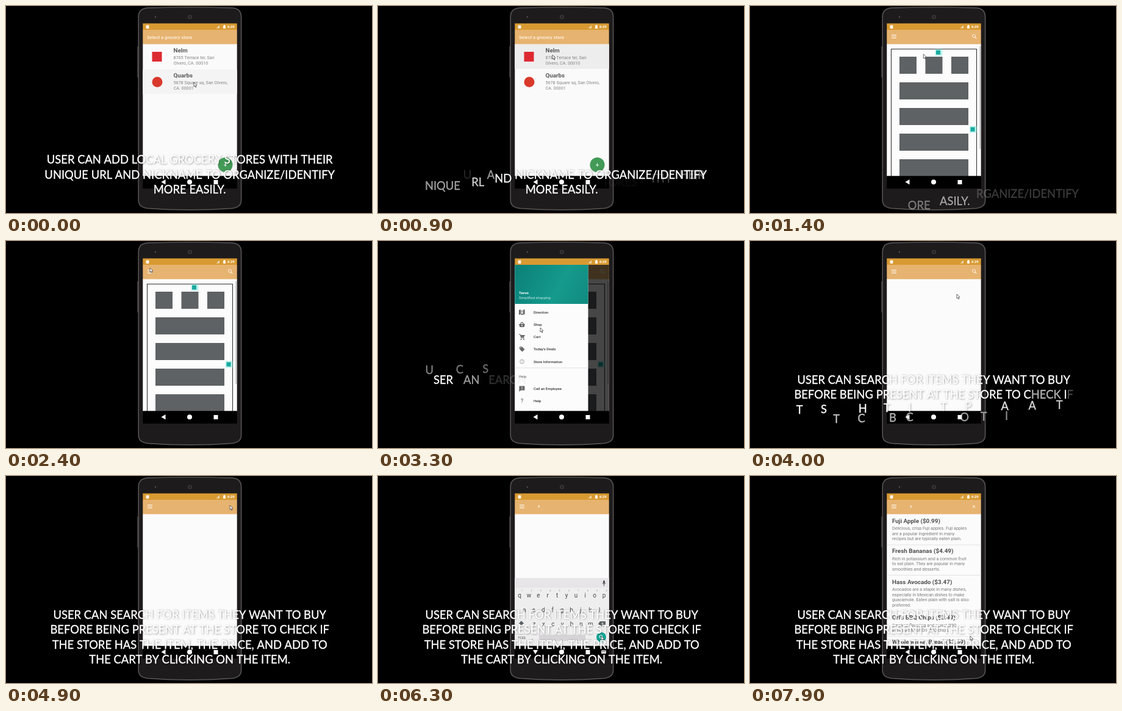
Write an HTML page with a canvas that moves like this. It is 600 px wide and 339 px high and loops after 8000 ms.

```html
<!DOCTYPE html>
<html lang="en">
<head>
<meta charset="utf-8">
<title>Grocery app demo</title>
<style>
html, body { margin: 0; width: 100%; height: 100%; overflow: hidden; background: #000; }
canvas { display: block; width: 600px; height: 339px; }
</style>
</head>
<body>
<canvas id="stage"></canvas>
<script>
const W = 600, H = 339, LOOP = 8000, STEP = 100;
const canvas = document.getElementById('stage');
const dpr = window.devicePixelRatio || 1;
canvas.width = W * dpr;
canvas.height = H * dpr;
const c = canvas.getContext('2d');

const UI = 'Roboto, "Open Sans", sans-serif';
const CAPTION_FONT = '18.4px Lato, "Open Sans", sans-serif';
const BAR = '#e6b370', STATUS = '#d89a32', TEAL = '#14a596', GREY = '#5e6264', PALE = '#fff6ea';

const STORES = [
  { y: 73, name: 'Nelm', lines: ['8765 Terrace ter, San', 'Olvero, CA. 00010'] },
  { y: 114, name: 'Quarbs', lines: ['5678 Square sq, San Olvero,', 'CA. 00001'] }
];
const ITEMS = [
  [73, 'Fuji Apple ($0.99)', 'Delicious, crisp Fuji apples. Fuji apples', 'are a popular ingredient in many', 'recipes but are typically eaten plain.'],
  [122.5, 'Fresh Bananas ($4.49)', 'Rich in potassium and a common fruit', 'to eat plain. They are popular in many', 'smoothies and desserts.'],
  [173, 'Hass Avocado ($3.47)', 'Avocados are a staple in many dishes,', 'especially in Mexican dishes to make', 'guacamole. Eaten plain with salt is also', 'preferred.'],
  [231.5, "Orl's BBQ Chips ($3.49)", 'Smoked flavoring and sweet BBQ', 'in every bite of Orl BBQ chips.'],
  [271, 'Whole wheat Bread ($3.69)']
];
const MENU = [[117, 'Direction'], [137, 'Shop'], [157, 'Cart'], [177, "Today's Deals"],
  [197.5, 'Store Information'], [242, 'Call an Employee'], [262, 'Help']];

const CAPTION_OUT = ['USER CAN ADD LOCAL GROCERY STORES WITH THEIR',
  'UNIQUE URL AND NICKNAME TO ORGANIZE/IDENTIFY', 'MORE EASILY.'];
const CAPTION_IN = ['USER CAN SEARCH FOR ITEMS THEY WANT TO BUY',
  'BEFORE BEING PRESENT AT THE STORE TO CHECK IF',
  'THE STORE HAS THE ITEM, THE PRICE, AND ADD TO',
  'THE CART BY CLICKING ON THE ITEM.'];

// time, x, y
const POINTER = [[0, 308, 125], [300, 304, 114], [900, 286, 80], [1300, 286, 80], [2200, 236, 44],
  [2700, 236, 44], [3300, 266, 142], [3500, 266, 140], [4000, 339, 87], [4500, 367, 48],
  [5300, 367, 48], [6200, 366, 262], [7100, 366, 263], [7900, 361, 262]];

const clamp = v => Math.max(0, Math.min(1, v));
const ramp = (t, from, to) => clamp((t - from) / (to - from));
const ease = v => v * v * (3 - 2 * v);

function box(x, y, w, h, fill) { c.fillStyle = fill; c.fillRect(x, y, w, h); }
function disc(x, y, r, fill) { c.fillStyle = fill; c.beginPath(); c.arc(x, y, r, 0, 7); c.fill(); }
function ring(x, y, r, color, width = 1) {
  c.strokeStyle = color; c.lineWidth = width; c.beginPath(); c.arc(x, y, r, 0, 7); c.stroke();
}
function round(x, y, w, h, r, fill) { c.fillStyle = fill; c.beginPath(); c.roundRect(x, y, w, h, r); c.fill(); }
function poly(points, fill) {
  c.fillStyle = fill; c.beginPath();
  points.forEach(p => c.lineTo(p[0], p[1]));
  c.closePath(); c.fill();
}
function line(points, color, width = 1) {
  c.strokeStyle = color; c.lineWidth = width; c.beginPath();
  points.forEach((p, i) => i ? c.lineTo(p[0], p[1]) : c.moveTo(p[0], p[1]));
  c.stroke();
}
// y is the middle of the capitals
function label(str, x, y, size, color, weight = 400, align = 'left') {
  c.font = `${weight} ${size}px ${UI}`;
  c.fillStyle = color; c.textAlign = align;
  c.fillText(str, x, y + size * 0.355);
}

function phone() {
  const left = 217.2, right = 385.6, mid = 301.4;
  round(215, 66, 3, 51, 1, '#3a3737');
  c.beginPath();
  c.moveTo(left, 18);
  c.quadraticCurveTo(left, 4.5, 232, 3.2);
  c.quadraticCurveTo(mid, 0.8, 371, 3.2);
  c.quadraticCurveTo(right, 4.5, right, 18);
  c.lineTo(right, 318);
  c.quadraticCurveTo(right, 329.5, 371, 331.3);
  c.quadraticCurveTo(mid, 336.5, 232, 331.3);
  c.quadraticCurveTo(left, 329.5, left, 318);
  c.closePath();
  c.fillStyle = '#1e1b1c';
  c.fill();
  c.strokeStyle = '#545051';
  c.lineWidth = 1.7;
  c.stroke();
  disc(mid, 18, 3.6, '#3a3638');
  disc(mid, 18, 1.8, '#242123');
  disc(245, 18, 1.2, '#55505a');
}

function statusBar() {
  box(224, 28, 155, 11, STATUS);
  round(229.5, 31.5, 5, 5.5, 1, PALE);
  poly([[344.5, 36.5], [350, 36.5], [350, 31.5]], 'rgba(255,255,255,.6)');
  box(356, 32, 4, 5, PALE);
  box(357, 31, 2, 1, PALE);
  label('6:29', 363, 34.2, 5.8, '#fff', 700);
}

function toolbar(mode) {
  box(224, 39, 155, 23.5, BAR);
  if (mode === 'title') return label('Select a grocery store', 231, 51, 7.6, '#fff3e0', 500);
  for (let i = 0; i < 3; i++) box(232, 47 + i * 2.5, 8, 1, PALE);
  if (mode === 'search') {
    ring(367, 49, 2.5, PALE, 0.9);
    line([[369, 51], [371.3, 53.3]], PALE, 1.1);
  }
}

function query(t) {
  if (t >= 6200) label('s', 262, 50, 6.5, PALE, 500);
  else if (t % 1000 < 500) box(262, 46, 0.8, 8, PALE);
  if (t >= 6700) {
    line([[365, 48], [369, 52]], PALE);
    line([[369, 48], [365, 52]], PALE);
  }
}

function navBar(typing) {
  box(224, 278.3, 155, 21, '#000');
  poly(typing ? [[254, 285], [262, 285], [258, 292]] : [[261.5, 284], [261.5, 292.5], [254.5, 288.2]], '#fff');
  disc(301, 288.3, 4, '#fff');
  box(340.5, 285, 7, 7, '#fff');
  if (typing) {
    round(366, 285.5, 8, 5.5, 1, '#ddd');
    for (let i = 0; i < 3; i++) box(367.2 + i * 2, 287, 1.2, 1, '#333');
  }
}

function storeList(hover) {
  box(224, 62, 155, 217, '#fbfafb');
  box(224, 63 + hover * 41, 155, 40, hover ? '#f5f4f5' : '#eeedee');
  STORES.forEach(s => {
    label(s.name, 274.5, s.y, 9.8, '#5c5c5c', 700);
    s.lines.forEach((str, i) => label(str, 274.5, s.y + 11.6 + i * 8.4, 7.2, '#858585'));
  });
  box(239.5, 75, 16, 16, '#dd2a32');
  disc(248, 124.5, 8.5, '#d9392b');
  disc(359.5, 261, 12, 'rgba(0,0,0,.13)');
  disc(359.5, 260, 12, '#439a57');
  label('+', 359.5, 260, 10, '#fff', 400, 'center');
}

function marker(x, y) {
  box(x - 5, y - 5.5, 12, 11, 'rgba(90,225,210,.4)');
  box(x - 3.5, y - 3.5, 7, 7, '#18a99f');
}

function storeMap() {
  box(224, 62, 155, 217, '#fdfcfd');
  line([[231.5, 279], [231.5, 70.5], [371.5, 70.5], [371.5, 279]], '#333', 1.1);
  for (let i = 0; i < 3; i++) box(245 + i * 42.5, 83, 28, 28, GREY);
  for (let i = 0; i < 4; i++) box(245, 125 + i * 42, 113, 28, GREY);
  marker(308.5, 76);
  marker(365, 202);
  box(376.5, 66, 2.5, 168, '#b9b9bb');
}

function results() {
  ITEMS.forEach(([y, name, ...body], n) => {
    label(name, 233, y, 9.9, '#505050', 700);
    body.forEach((str, i) => label(str, 233, y + 12.5 + i * 8.5, 7.2, '#7b7b7b'));
    if (n < 4) box(224, y + 13 + body.length * 8.5 + 1, 155, 0.8, '#dedede');
  });
}

function keyRow(keys, x, y, step) {
  [...keys].forEach((k, i) => label(k, x + i * step, y, 10, '#454a4d', 400, 'center'));
}

function keyboard(shift) {
  c.save();
  c.translate(0, shift);
  box(224, 167, 155, 112, '#efeeef');
  box(224, 167, 155, 16, '#e7e5e7');
  round(369, 171, 3, 5.5, 1.5, '#555');
  line([[367.8, 175], [370.5, 178], [373.2, 175]], '#555', 0.8);
  box(370, 178, 1, 2, '#555');
  [...'1234567890'].forEach((k, i) => label(k, 236 + i * 15.4, 187.5, 3.6, '#888', 400, 'center'));
  keyRow('qwertyuiop', 232, 195, 15.4);
  keyRow('asdfghjkl', 240, 219, 15.4);
  keyRow('zxcvbnm', 256, 242, 15.4);
  poly([[235, 237], [239.5, 242], [237, 242], [237, 246], [233, 246], [233, 242], [230.5, 242]], '#5b6064');
  poly([[361, 242], [364, 238], [373, 238], [373, 246], [364, 246]], '#5b6064');
  label('×', 368, 242, 7, '#fff', 400, 'center');
  label('?123', 235.5, 265, 5.8, '#555', 500, 'center');
  label(',', 253, 265, 8, '#555', 400, 'center');
  round(264, 260, 76, 10, 1, '#d6d4d6');
  label('.', 349, 265, 8, '#555', 400, 'center');
  disc(366, 264, 8, TEAL);
  ring(365.3, 263, 2.4, '#fff');
  line([[367, 265], [369.2, 267.2]], '#fff', 1.1);
  c.restore();
}

function menuIcon(i, x, y) {
  const ink = '#686868';
  switch (i) {
    case 0:
      for (let k = 0; k < 3; k++) {
        const d = k % 2 ? 1 : 0;
        poly([[x - 5 + k * 3.4, y - 4 + d], [x - 2.2 + k * 3.4, y - 5 + d * 2], [x - 2.2 + k * 3.4, y + 3 + d], [x - 5 + k * 3.4, y + 4]], ink);
      }
      box(x - 0.8, y - 2, 1.6, 4, '#fff');
      break;
    case 1:
      poly([[x - 5, y - 1], [x + 5, y - 1], [x + 3.5, y + 4], [x - 3.5, y + 4]], ink);
      line([[x - 3, y - 1], [x, y - 4], [x + 3, y - 1]], ink, 1.2);
      disc(x, y + 1.4, 1, '#fff');
      break;
    case 2:
      line([[x - 5, y - 4], [x - 3, y - 4], [x - 1, y + 1.7], [x + 4, y + 1.7]], ink, 1.1);
      poly([[x - 2.5, y - 3], [x + 5, y - 3], [x + 3, y + 0.7], [x - 1, y + 0.7]], ink);
      disc(x - 1.5, y + 4, 1.1, ink);
      disc(x + 3, y + 4, 1.1, ink);
      break;
    case 3:
      poly([[x - 4, y - 4], [x, y - 4], [x + 4.5, y + 0.5], [x + 0.5, y + 4.5], [x - 4, y]], ink);
      disc(x - 2.3, y - 2.3, 0.8, '#fff');
      break;
    case 4:
      ring(x, y, 3.3, '#8b8b8b', 0.8);
      label('i', x, y, 4.6, '#8b8b8b', 500, 'center');
      break;
    case 5:
      box(x - 4.5, y - 4.5, 9, 7, ink);
      poly([[x - 4.5, y + 2], [x - 1.5, y + 2], [x - 4.5, y + 5]], ink);
      label('!', x, y - 1, 6, '#fff', 700, 'center');
      break;
    default:
      label('?', x, y, 8.5, ink, 500, 'center');
  }
}

function drawer(open) {
  box(224, 39, 155, 240, `rgba(0,0,0,${0.72 * open})`);
  c.save();
  c.translate(-121 * (1 - open), 0);
  box(224, 39, 120.5, 240, '#fdfcfd');
  const g = c.createLinearGradient(224, 39, 344, 103);
  g.addColorStop(0, '#0b7f78');
  g.addColorStop(0.6, '#159a8c');
  g.addColorStop(1, '#118a80');
  box(224, 39, 120.5, 64, g);
  label('Tavvo', 231, 84.5, 6, '#fff', 700);
  label('Simplified shopping', 231, 92.5, 5.9, '#c9ece7');
  MENU.forEach(([y, str], i) => {
    menuIcon(i, 236, y);
    label(str, 255, y, 6, '#333', 500);
  });
  box(224, 207.5, 120.5, 0.8, '#dcdcdc');
  label('Help', 231, 222, 6, '#777', 500);
  c.restore();
}

function pointer(t) {
  const i = Math.max(1, POINTER.findIndex(p => p[0] >= t));
  const [t0, x0, y0] = POINTER[i - 1], [t1, x1, y1] = POINTER[i];
  const k = ease(ramp(t, t0, t1));
  const x = x0 + (x1 - x0) * k, y = y0 + (y1 - y0) * k;
  const shape = [[0, 0], [0, 7], [1.6, 5.6], [2.8, 8.2], [3.9, 7.7], [2.8, 5.1], [4.9, 5]].map(p => [x + p[0], y + p[1]]);
  poly(shape, '#fff');
  line([...shape, shape[0]], '#444', 0.8);
}

function screen(t) {
  c.save();
  c.beginPath(); c.rect(224.3, 28.5, 154.4, 270.5); c.clip();
  const typing = t >= 5600 && t < 7500;
  if (t < 1400) {
    storeList(t < 500 ? 1 : 0);
    toolbar('title');
  } else if (t < 3500) {
    storeMap();
    toolbar('search');
  } else {
    box(224, 62, 155, 217, '#fcfbfc');
    if (t >= 6700) results();
    toolbar(t < 4700 ? 'search' : 'query');
    if (t >= 4700) query(t);
  }
  const open = ease(ramp(t, 2400, 2700)) * (1 - ease(ramp(t, 3400, 3700)));
  if (open > 0) drawer(open);
  const up = ease(ramp(t, 5500, 5700)) * (1 - ease(ramp(t, 7300, 7600)));
  if (up > 0) keyboard(112 * (1 - up));
  statusBar();
  navBar(typing);
  pointer(t);
  c.restore();
}

// pose(index) gives the alpha and offset of a word's first letter and of its rest
function caption(lines, top, pose) {
  c.save();
  c.font = CAPTION_FONT;
  c.textAlign = 'left';
  c.fillStyle = c.strokeStyle = '#fff';
  c.lineWidth = 0.35;
  c.lineJoin = 'round';
  const width = s => c.measureText(s).width;
  let n = 0;
  lines.forEach((str, row) => {
    const left = 301.2 - width(str) / 2, y = top + row * 24.5;
    let before = '';
    str.split(' ').forEach(word => {
      const p = pose(n++), rest = word.slice(1);
      const put = (s, x, dy, alpha) => {
        if (alpha <= 0) return;
        c.globalAlpha = alpha;
        c.shadowColor = 'rgba(0,0,0,.45)';
        c.shadowBlur = 3 * dpr;
        c.shadowOffsetX = c.shadowOffsetY = 0.8 * dpr;
        c.fillText(s, left + x, y + dy);
        c.shadowColor = 'transparent';
        c.strokeText(s, left + x, y + dy);
      };
      put(word[0], width(before), p.headY, p.head);
      put(rest, width(before + word) - width(rest), p.restY, p.rest);
      before += word + ' ';
    });
  });
  c.restore();
}

function leaving(t) {
  return i => {
    const age = Math.max(0, t - 130 - 70 * i);
    return { head: clamp(1 - age / 160), headY: 0, rest: clamp(1.15 - age / 380), restY: age * 0.088 };
  };
}

function arriving(t) {
  return i => {
    const age = t - 3240 - 20 * i;
    return {
      head: age > 0 ? clamp(0.35 + age / 500) : 0, headY: -18 * (1 - clamp(age / 390)),
      rest: clamp((t - 3190 - 46 * i) / 110), restY: 0
    };
  };
}

function draw(t) {
  c.setTransform(dpr, 0, 0, dpr, 0, 0);
  box(0, 0, W, H, '#000');
  phone();
  screen(t);
  if (t < 1800) caption(CAPTION_OUT, 258, leaving(t));
  if (t >= 3200) caption(CAPTION_IN, 233.5, arriving(t));
}

const start = performance.now();
function tick() {
  const t = (performance.now() - start) % LOOP;
  draw(Math.floor(t / STEP) * STEP);
  requestAnimationFrame(tick);
}
tick();
</script>
</body>
</html>
```
